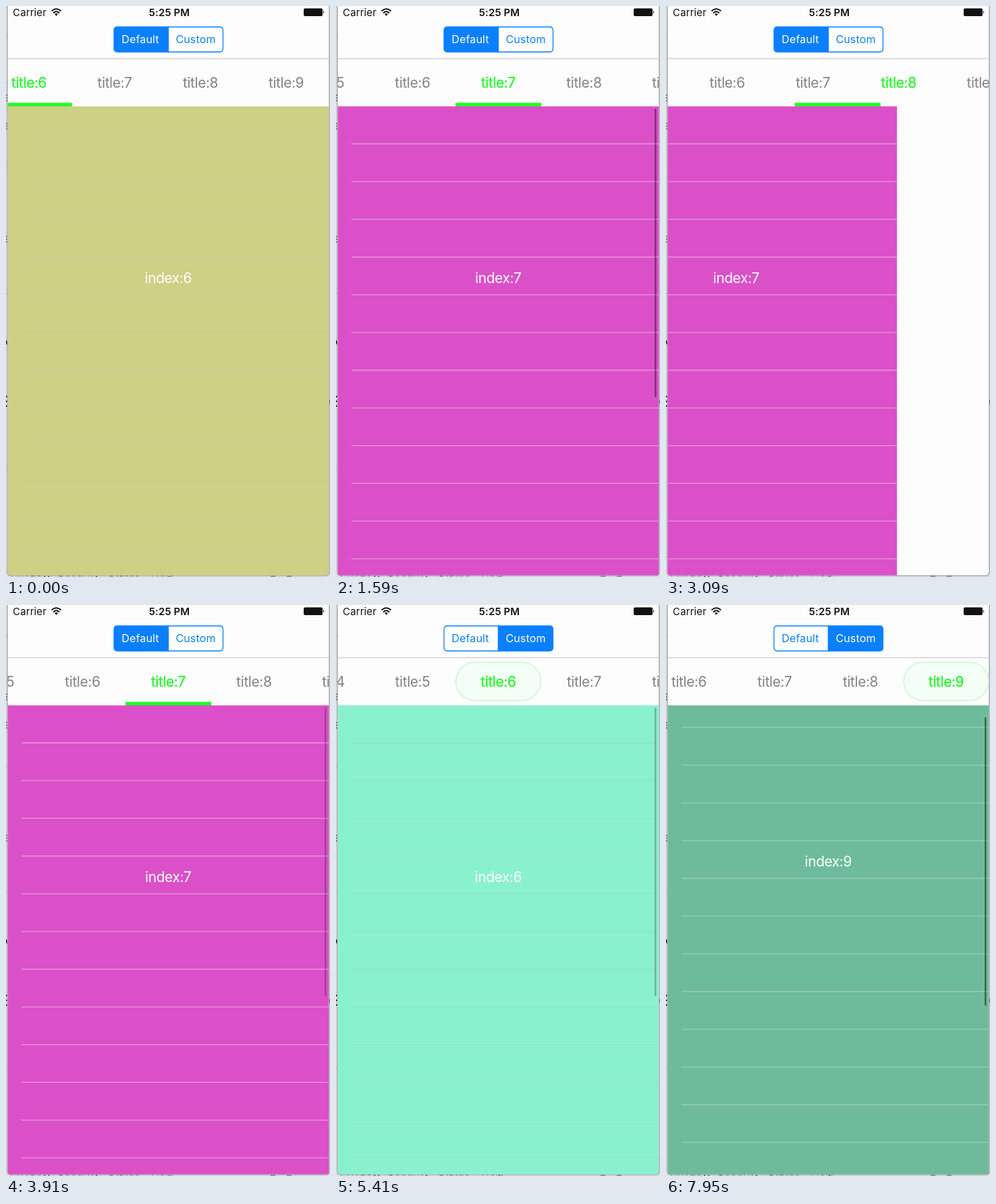
Recreate the animation shown at these times as an HTML page. Size 480 px wide and 845 px high, loop 8 s.

```html
<!DOCTYPE html>
<html lang="en">
<head>
<meta charset="utf-8">
<title>Tab pager</title>
<style>
  html, body { margin: 0; width: 100%; height: 100%; overflow: hidden; background: #dedee2; }
  svg { display: block; width: 100vw; height: 100vh; }
  text { font-family: Inter, "Open Sans", sans-serif; text-anchor: middle; }
  .title, .index { font-size: 20.9px; letter-spacing: -.4px; }
  .title { fill: #838383; }
  .title.active { fill: #2bf532; stroke: #2bf532; stroke-width: .4px; }
  .index { fill: #fff; }
  .segment { font-size: 16.1px; letter-spacing: .1px; }
  .status { font-size: 14.9px; letter-spacing: .15px; fill: #111; }
  .behind { font-size: 16px; fill: #333a48; text-anchor: start; }
</style>
</head>
<body>
<svg id="stage" viewBox="0 0 480 845">
  <defs>
    <clipPath id="tabClip"><rect x="2.5" y="79" width="476" height="70"/></clipPath>
    <clipPath id="pageClip"><path d="M2.5 148.6H478.5V838Q478.5 842.5 474 842.5H7Q2.5 842.5 2.5 838Z"/></clipPath>
  </defs>

  <g id="behind">
    <path d="M0 45.5H2M0 113.5H2M0 239.5H2M0 425.5H2M0 686.5H2" stroke="#aaa"/>
    <path d="M0 132H3M0 136H3M0 140H3M0 174H3M0 178H3M0 182H3M0 341H3M0 345H3M0 349H3" stroke="#555" stroke-width="1.3"/>
    <path d="M0 495L2 501M0 578H3M0 585H3M0 592H3M478 590L480 583" stroke="#111" stroke-width="2"/>
    <text class="behind" x="6" y="844">Privacy,</text>
    <text class="behind" x="76" y="844">Security</text>
    <text class="behind" x="151" y="844">Status</text>
    <text class="behind" x="215" y="844">Help</text>
    <path d="M392 843.5H399M416 843.5H423" stroke="#666" stroke-width="2"/>
  </g>
  <rect x="2" y="-10" width="477" height="853" rx="5" fill="#fefdfe" stroke="#909090" stroke-width="1.1"/>

  <text class="status" x="35" y="14.5">Carrier</text>
  <g fill="none" stroke="#111" stroke-width="2">
    <path d="M67.5 7.5Q74.5 1 81.5 7.5M70 10.4Q74.5 6.2 79 10.4"/>
    <path d="M72 12L74.5 14.8L77 12Q74.5 10 72 12Z" fill="#111" stroke="none"/>
  </g>
  <text class="status" x="242" y="14.5" font-weight="600">5:25 PM</text>
  <rect x="441" y="3.5" width="28" height="11.5" rx="2" fill="#111"/>
  <path d="M470 7Q472.5 9.2 470 11.5Z" fill="#111"/>

  <path id="leftHalf" d="M240.5 31H165Q160 31 160 36V63Q160 68 165 68H240.5Z" stroke="#0a80ff" stroke-width="1.3"/>
  <path id="rightHalf" d="M240.5 31H316.5Q321.5 31 321.5 36V63Q321.5 68 316.5 68H240.5Z" stroke="#0a80ff" stroke-width="1.3"/>
  <text id="leftLabel" class="segment" x="199" y="55.2">Default</text>
  <text id="rightLabel" class="segment" x="281" y="55.2">Custom</text>
  <path d="M2.5 77.8H478.5" stroke="#cbcbce" stroke-width="1.3"/>

  <g clip-path="url(#tabClip)">
    <g id="tabs">
      <rect id="pill" y="84.5" width="126" height="57" rx="28.5" fill="#f3fff6" stroke="#d0f5ce" stroke-width="1.5"/>
      <rect id="underline" y="143.3" width="127" height="5.7" fill="#20fb26"/>
    </g>
  </g>
  <g id="pages" clip-path="url(#pageClip)"></g>
</svg>
<script>
const LOOP = 8000, TAB = 127, PAGE = 476, LEFT = 2.5, ROW = 55.83;
const SWITCH = 4480;
const END = 793.75, AT7 = 714.4, AT6 = 587.4;

// Each track lists [ms, value]; a repeated time is a hard jump.
const tabScroll = [[904, END], [1204, AT7], [1950, AT7], [2430, END], [2800, END], [3250, AT7],
  [SWITCH, AT7], [SWITCH, AT6], [5850, AT6], [6500, END]];
const marker = [[904, 6], [1204, 7], [1950, 7], [2430, 8], [2800, 8], [3250, 7],
  [SWITCH, 7], [SWITCH, 6], [6900, 6], [7200, 9]];
const pagePos = [[904, 6], [904, 7], [1950, 7], [2430, 8], [2800, 8], [3250, 7],
  [SWITCH, 7], [SWITCH, 6], [6900, 6], [6900, 9]];
const barAlpha = [[1000, 0], [1250, .4], [1700, .4], [1900, 0], [3150, 0], [3250, .45], [3780, .45], [4050, 0],
  [SWITCH, 0], [4600, .45], [5280, .45], [5560, 0], [6650, 0], [6770, .45]];
const rowScroll = [[7550, 0], [7950, 22.8]];
const selected = [[0, 6], [904, 7], [1950, 6], [2430, 8], [3100, 7], [SWITCH, 6], [6000, -1], [6900, 9]];

const pageStyles = [
  { index: 6, custom: false, fill: '#cdd085', line: '#cbcb92' },
  { index: 7, custom: false, fill: '#db50c8', line: '#e995dd' },
  { index: 6, custom: true, fill: '#8af1cf', line: '#90e4ca' },
  { index: 9, custom: true, fill: '#6ebb9c', line: '#96cfb8' }
];

const $ = id => document.getElementById(id);

function add(parent, tag, attrs, text) {
  const el = document.createElementNS('http://www.w3.org/2000/svg', tag);
  set(el, attrs);
  if (text) el.textContent = text;
  return parent.appendChild(el);
}

function set(el, attrs) {
  for (const key in attrs) el.setAttribute(key, attrs[key]);
}

function sample(track, t) {
  const next = track.findIndex(step => step[0] > t);
  if (next < 0) return track[track.length - 1][1];
  if (next === 0) return track[0][1];
  const [t0, a] = track[next - 1], [t1, b] = track[next];
  const x = (t - t0) / (t1 - t0);
  return a + (b - a) * x * x * (3 - 2 * x);
}

const hold = (track, t) => track.filter(step => step[0] <= t).pop()[1];
const show = (el, on) => set(el, { visibility: on ? 'visible' : 'hidden' });

const titles = Array.from({ length: 10 }, (_, i) =>
  add($('tabs'), 'text', { class: 'title', x: (i + .5) * TAB - .2, y: 120.8 }, 'title:' + i));

const pages = pageStyles.map(style => {
  const group = add($('pages'), 'g', {});
  add(group, 'rect', { y: 148, width: PAGE, height: 695, fill: style.fill });
  const rows = add(group, 'g', {});
  let lines = '';
  for (let i = 0; i < 14; i++) lines += `M20.5 ${204 + i * ROW}H${PAGE}`;
  add(rows, 'path', { d: lines, stroke: style.line, 'stroke-width': 1.3 });
  add(rows, 'text', { class: 'index', x: PAGE / 2 - .2, y: 410 }, 'index:' + style.index);
  const bar = add(group, 'rect', { x: 469.5, y: 152, width: 2.6, height: 427, rx: 1.3 });
  return { ...style, group, rows, bar };
});

function render(t) {
  const custom = t >= SWITCH, scroll = sample(tabScroll, t);
  const mark = sample(marker, t) * TAB, page = sample(pagePos, t);
  const active = hold(selected, t), down = sample(rowScroll, t), alpha = sample(barAlpha, t);

  set($('leftHalf'), { fill: custom ? '#fff' : '#0a80ff' });
  set($('rightHalf'), { fill: custom ? '#0a80ff' : '#fff' });
  set($('leftLabel'), { fill: custom ? '#0a80ff' : '#fff' });
  set($('rightLabel'), { fill: custom ? '#fff' : '#0a80ff' });

  set($('tabs'), { transform: `translate(${LEFT - scroll} 0)` });
  set($('pill'), { x: mark + .5 });
  set($('underline'), { x: mark });
  show($('pill'), custom);
  show($('underline'), !custom);
  titles.forEach((el, i) => el.classList.toggle('active', i === active));

  for (const p of pages) {
    show(p.group, p.custom === custom);
    set(p.group, { transform: `translate(${LEFT + (p.index - page) * PAGE} 0)` });
    set(p.rows, { transform: `translate(0 ${-down})` });
    set(p.bar, { y: 152 + down * .62, opacity: alpha });
  }
}

function tick() {
  render(performance.now() % LOOP);
  requestAnimationFrame(tick);
}
tick();
</script>
</body>
</html>
```
